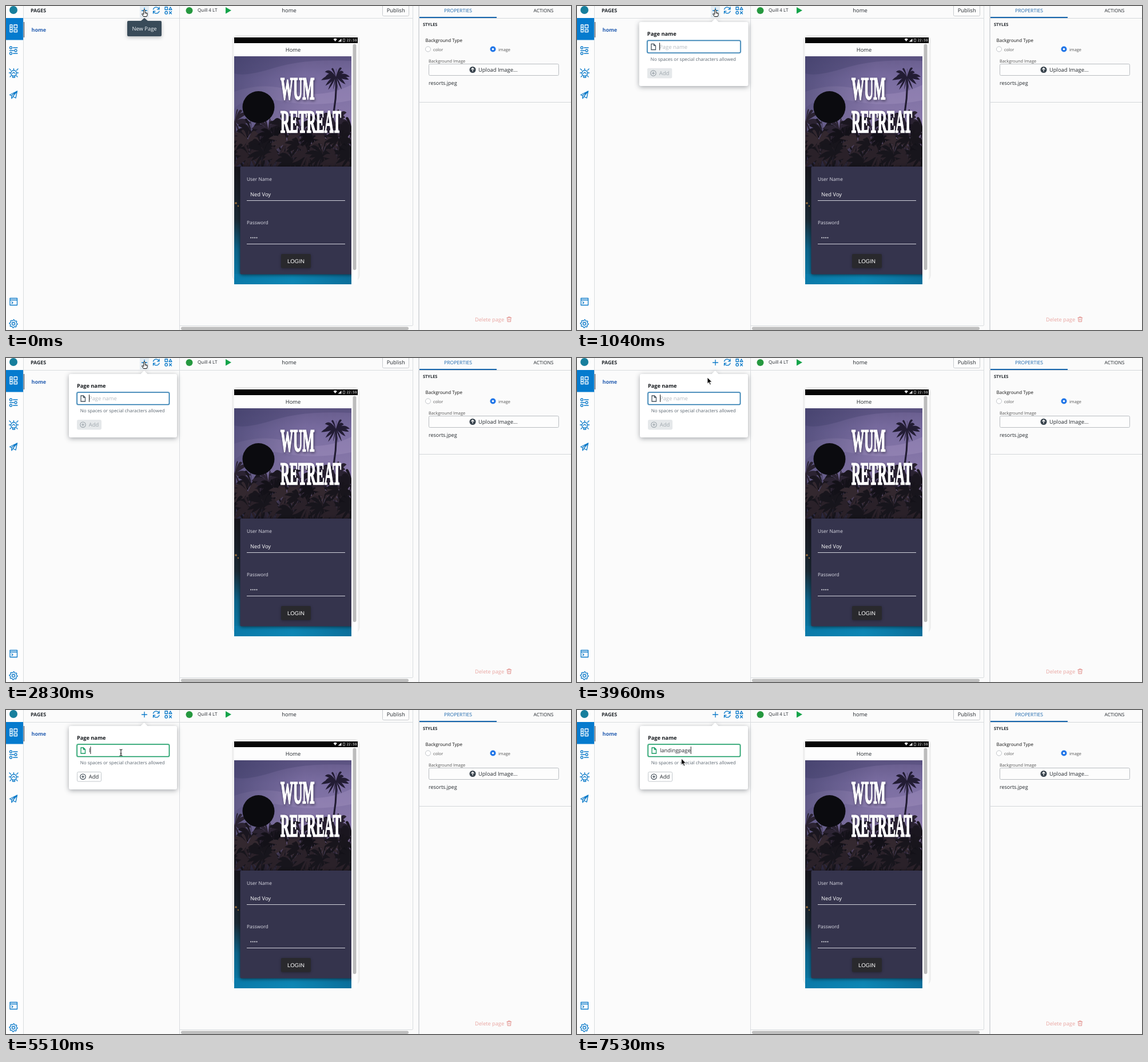
Write an HTML page that moves like this. It is 988 px wide and 567 px high and loops after 8000 ms.

```html
<!DOCTYPE html>
<html lang="en">
<head>
<meta charset="utf-8">
<title>Page builder</title>
<style>
html, body { margin: 0; width: 100%; height: 100%; overflow: hidden; background: #fbfbfb; }
svg { display: block; width: 988px; height: 567px; }
text { font: 9.4px "Open Sans", "Noto Sans", sans-serif; fill: #24292e; text-rendering: geometricPrecision; white-space: pre; }
.bold { font-weight: 700; }
.mid { text-anchor: middle; }
.s73 { font-size: 7.35px; fill: #555; }
.s8 { font-size: 8px; }
.s86 { font-size: 8.6px; }
.field { font-size: 8.4px; fill: #dcdce6; }
.light { fill: #fff; }
.wordmark { font: 700 22.3px "Liberation Serif", serif; fill: #fff; stroke: #fff; stroke-width: .9; }
.rule { stroke: #d9dcdf; fill: none; }
.icon { fill: none; stroke: #0b7ac9; stroke-width: 1.3; stroke-linecap: round; stroke-linejoin: round; }
.card { filter: drop-shadow(0 2px 4px rgba(20, 30, 40, .38)); }
</style>
</head>
<body>
<svg viewBox="0 0 988 567">
  <defs>
    <linearGradient id="sky" x2="0" y2="1">
      <stop offset="0" stop-color="#675c8c"/>
      <stop offset=".1" stop-color="#7a6da1"/>
      <stop offset=".28" stop-color="#8a7aab"/>
      <stop offset=".37" stop-color="#66577b"/>
      <stop offset=".44" stop-color="#2b2430"/>
      <stop offset=".6" stop-color="#17151c"/>
    </linearGradient>
    <linearGradient id="shade">
      <stop offset="0" stop-color="#34365f" stop-opacity=".5"/>
      <stop offset=".6" stop-color="#34365f" stop-opacity="0"/>
    </linearGradient>
    <linearGradient id="shore" x2="0" y2="1">
      <stop offset="0" stop-color="#17151c"/>
      <stop offset=".45" stop-color="#1b2a35"/>
      <stop offset=".7" stop-color="#0c6389"/>
      <stop offset="1" stop-color="#0a7dab"/>
    </linearGradient>
    <linearGradient id="pool">
      <stop offset="0" stop-color="#0a7aa9"/>
      <stop offset=".5" stop-color="#0d86b4"/>
      <stop offset="1" stop-color="#0b6f9b"/>
    </linearGradient>
    <clipPath id="photoClip"><rect x="399" y="88" width="205" height="399"/></clipPath>
  </defs>

  <rect width="988" height="567" fill="#fbfbfb"/>

  <!-- sidebar -->
  <rect width="30" height="567" fill="#fdfdfd"/>
  <path class="rule" d="M30.5 0V567M30 21.5H303"/>
  <circle cx="13" cy="7" r="7" fill="#177f9d"/>
  <rect y="21" width="30" height="38.500" fill="#057bce"/>
  <rect x="31" y="28" width="1" height="27" fill="#2d3440"/>
  <g class="icon">
    <path stroke="#fff" d="M7 33h4v12.500h-4zM14 33h5.500v5.500h-5.500zM14 41.500h5.500v4h-5.500zM7 37h4M7 41h4"/>
    <path d="M12.500 73h7.500M6.500 78h7M12.500 83h7.500"/>
    <circle cx="8.500" cy="73" r="2"/><circle cx="17" cy="78" r="2"/><circle cx="8.500" cy="83" r="2"/>
    <circle cx="13.500" cy="117.500" r="5"/>
    <path d="M11.500 122.500v2.500h4v-2.500M6 110l2.500 2.500M21 110l-2.500 2.500M13.500 109.500v2.500M5.500 117h2M19.500 117h2M7 124l2-2M20 124l-2-2M11 118l2.500-2 2.500 2"/>
    <path d="M6.500 155.500 19.500 149 17 161 12 158.500 10 162 9.500 157ZM9.500 157 19.500 149 12 158.500"/>
    <path d="M7 511.500h12.500v12h-12.500zM7 514.500h12.500M10 517.500l2 1.700-2 1.700"/>
    <circle cx="13" cy="556" r="2.500"/>
    <path id="gear"/>
  </g>

  <!-- page list -->
  <text class="bold" x="43" y="11" style="font-size:8.8px">PAGES</text>
  <text class="bold" x="44.500" y="45" style="font-size:9px;fill:#2860b2">home</text>
  <rect id="hover" x="234" width="16" height="20" fill="#e3ecf3"/>
  <g class="icon">
    <path d="M237.500 8h9M242 3.500v9"/>
    <path d="M257.500 6a5.300 5.300 0 0 1 10-.500M268 2v3.800h-3.600M268 9a5.300 5.300 0 0 1-10 .500M257.500 13V9.200h3.600"/>
    <path d="M278 2h4.500v4.500h-4.500zM287.500 2l2.500 4.500h-5zM285.500 9.800l4 4M289.500 9.800l-4 4"/>
    <circle cx="280.200" cy="11.800" r="2.300"/>
  </g>

  <!-- canvas -->
  <path class="rule" d="M303.500 0V567M304 21.500H711.500M711.500 0V559M304 559.500H711"/>
  <circle cx="320.500" cy="8" r="6" fill="#25983f"/>
  <text class="s8" x="335" y="10">Quill 4 LT</text>
  <path d="M384 2 394 7.800 384 13.500Z" fill="#14a44a"/>
  <text class="mid" x="495" y="11">home</text>
  <rect x="658.500" y="-5.500" width="46" height="23" rx="2" fill="#fdfdfd" stroke="#c8cbce"/>
  <text class="mid" x="681.700" y="11">Publish</text>
  <rect x="306" y="561.500" width="398" height="5.500" rx="2.700" fill="#bfbfbf"/>

  <!-- phone -->
  <rect x="395.500" y="51" width="223" height="430" rx="9" fill="#eaeaea"/>
  <rect x="397" y="53" width="220" height="426" rx="6" fill="#f3f3f3"/>
  <rect x="399" y="65" width="216" height="422" fill="#fdfdfd"/>
  <rect x="399" y="55" width="216" height="10" fill="#060606"/>
  <g fill="#eee">
    <path d="M572.500 58q3.200-2.500 6.400 0L575.700 62ZM580.500 62.500h6v-5.500z"/>
    <path d="M589.500 57.500h3v5h-3z" fill="none" stroke="#bbb" stroke-width=".8"/>
  </g>
  <text class="light" x="595.500" y="62" style="font:6px 'DejaVu Sans Mono',monospace">22:59</text>
  <text class="mid" x="502" y="80">Home</text>
  <g clip-path="url(#photoClip)">
    <rect x="399" y="88" width="205" height="399" fill="url(#sky)"/>
    <path d="M399 88H604V96Q520 92 470 108T399 118Z" fill="#4a4470" opacity=".4"/>
    <path d="M399 150Q450 132 500 148T604 138V165Q540 178 480 166T399 180Z" fill="#a595c2" opacity=".35"/>
    <rect x="399" y="88" width="205" height="200" fill="url(#shade)"/>
    <g id="palms"></g>
    <rect x="399" y="281" width="205" height="206" fill="url(#shore)"/>
    <g fill="#c48a43" opacity=".75"><circle cx="402" cy="345" r="1.800"/><circle cx="406" cy="350" r="1.200"/></g>
    <rect x="399" y="469" width="205" height="18" fill="url(#pool)"/>
    <circle cx="441.500" cy="177" r="28" fill="#0b0b0f"/>
    <g style="filter:drop-shadow(1px 2px 2px rgba(20,15,40,.6))">
      <g transform="translate(480 163) scale(1 2.500)"><text class="wordmark">WUM</text></g>
      <g transform="translate(480 221) scale(1 2.500)"><text class="wordmark">RETREAT</text></g>
    </g>
    <rect x="409.500" y="281" width="200" height="188.500" rx="2" fill="#35344d" style="filter:drop-shadow(0 1px 3px rgba(0,0,0,.6))"/>
    <text class="field" x="421" y="305.500">User Name</text>
    <text class="light" x="427" y="333">Ned Voy</text>
    <text class="field" x="421" y="382">Password</text>
    <path d="M428.300 405.500h11" stroke="#f2f2f6" stroke-width="2" stroke-linecap="round" stroke-dasharray="0 3.400"/>
    <path d="M421 340.500H593M421 416.500H593" stroke="#d2d2db"/>
    <rect x="481" y="434" width="52" height="24.500" rx="2" fill="#29292d" style="filter:drop-shadow(0 1px 2px rgba(0,0,0,.3))"/>
    <text class="mid" x="507" y="449.500" style="font:9.700px 'Liberation Sans',sans-serif;fill:#fff">LOGIN</text>
  </g>
  <rect x="606.500" y="66.500" width="6" height="395.500" rx="3" fill="#bcbcbc"/>

  <!-- properties -->
  <path class="rule" d="M722 0V567" style="stroke:#d8dbde;stroke-width:2"/>
  <path class="rule" d="M723 21.500H988M723 168.500H988" style="stroke:#d3d6d9"/>
  <rect x="723" y="19" width="135" height="2" fill="#1766ad"/>
  <text class="mid s86" x="790.500" y="10.500" style="fill:#1c67ad">PROPERTIES</text>
  <text class="mid" x="940" y="10.500" style="font-size:8.400px">ACTIONS</text>
  <text class="bold" x="729" y="35" style="font-size:7.400px">STYLES</text>
  <text class="s8" x="733.500" y="63" style="fill:#111">Background Type</text>
  <circle cx="738" cy="75.500" r="4.500" fill="#fff" stroke="#b3b7bb" stroke-width=".8"/>
  <text class="s73" x="747" y="78.500">color</text>
  <circle cx="851.500" cy="75.500" r="5" fill="#2377e8"/><circle cx="851.500" cy="75.500" r="1.800" fill="#fff"/>
  <text class="s73" x="861" y="78.500">image</text>
  <text class="s73" x="739" y="99">Background Image</text>
  <rect x="739.500" y="101.500" width="227" height="20" rx="2" fill="#fdfdfd" stroke="#b9bdc1"/>
  <circle cx="816" cy="111.500" r="5.500" fill="#37424c"/>
  <path d="M816 114.500v-5.500M813.500 111l2.500-2.500 2.500 2.500" fill="none" stroke="#fff" stroke-width="1.300"/>
  <text x="826" y="115">Upload Image...</text>
  <text x="739" y="138" style="font-size:9px">resorts.jpeg</text>
  <text x="820" y="552" style="font-size:9.200px;fill:#e9a5a0">Delete page</text>
  <path d="M875.500 545.500h8.500M878 545.500v-1.500h3.500v1.500M876.500 546l.600 6.500h5.300l.600-6.500M878.700 547.500v3M880.800 547.500v3" fill="none" stroke="#e08b86" stroke-width=".9"/>

  <!-- page name popover -->
  <g id="popover">
    <g class="card"><path d="M113 28H235.500L241.500 22 247.500 28H296a3 3 0 0 1 3 3V136a3 3 0 0 1-3 3H113a3 3 0 0 1-3-3V31a3 3 0 0 1 3-3Z" fill="#fff"/></g>
    <text class="bold" x="124" y="52" style="font-size:9.200px;fill:#15191d">Page name</text>
    <g id="frame">
      <rect x="123.500" y="59.500" width="162.500" height="22.500" rx="3" fill="none" stroke-width="2" stroke-opacity=".35"/>
      <rect x="124.300" y="60.300" width="161" height="21" rx="2" fill="#fff" stroke-width="1.300"/>
    </g>
    <path id="file" d="M131 66h4.500l3 3v7h-7.500zM135.500 66v3h3" fill="none" stroke-width="1.300"/>
    <text id="value" x="145" y="74.300"></text>
    <rect id="caret" y="64" width="1" height="13" fill="#222"/>
    <text class="s8" x="129.700" y="95" style="fill:#5b6670">No spaces or special characters allowed</text>
    <g id="add">
      <rect x="124.500" y="108.500" width="42" height="16.500" rx="2"/>
      <g fill="none" stroke-width="1.100"><circle cx="134.500" cy="116.700" r="4.700"/><path d="M132 116.700h5M134.500 114.200v5"/></g>
      <text x="144.800" y="120.200">Add</text>
    </g>
  </g>

  <g id="tooltip">
    <path d="M214 26H236L242 21 248 26H270a2 2 0 0 1 2 2V51a2 2 0 0 1-2 2H214a2 2 0 0 1-2-2V28a2 2 0 0 1 2-2Z" fill="#394b59" style="filter:drop-shadow(0 2px 3px rgba(20,30,40,.3))"/>
    <text class="mid" x="242" y="43" style="fill:#f5f8fa">New Page</text>
  </g>

  <g id="hand"><path d="M-1.300-4.500q1.300-1.500 2.400 0V0l4 1v3.500L4 7H-1.500L-4.500 2.500q.500-1.500 2 0l1.200 1Z" fill="#fff" stroke="#111" stroke-width="1"/><path d="M1.200 0v2M3.200.500v2" stroke="#111" stroke-width=".7"/></g>
  <g id="arrow"><path d="M0 0V11L2.600 8.700 4.500 13 6.300 12.200 4.400 8H8Z" fill="#0b0b0b" stroke="#fff" stroke-width=".8"/></g>
  <g id="beam"><path d="M-2.500-5.500Q0-5.500 0-4Q0-5.500 2.500-5.500M0-4V4M-2.500 5.500Q0 5.500 0 4Q0 5.500 2.500 5.500M-1.300 1.500h2.600" fill="none" stroke="#161616" stroke-width="1.100"/></g>
</svg>
<script>
const $ = id => document.getElementById(id);
const LOOP = 8000;

// Each table holds [start ms, ...state]; the last started row applies.
const popSteps = [[0, 0, 0], [860, .55, .5], [1040, 1.01, 1], [1160, 1, 1]]; // scale, focus glow
const tipSteps = [[0, 1, 1], [860, .1, .87], [1040, 0, .8]]; // opacity, scale
const caretSteps = [[0, 1], [1400, 0], [1880, 1], [2350, 0], [2830, 1], [3360, 0], [3840, 1],
  [4310, 0], [4790, 1], [5270, 0], [5510, 1], [7050, 0], [7530, 1]];
const typeSteps = [[0, 0], [5510, 1], [5630, 2], [5750, 4], [5870, 5], [5980, 7],
  [6220, 8], [6340, 9], [6460, 10], [6570, 11]];
const cursorSteps = [[0, 'hand', 242, 11.5], [3840, 'arrow', 238, 15], [3960, 'arrow', 228, 34],
  [4080, 'arrow', 214, 54], [4190, 'beam', 204, 71], [4310, 'beam', 201, 74.5],
  [7170, 'beam', 199, 75.5], [7290, 'beam', 194, 78], [7410, 'arrow', 186, 83], [7530, 'arrow', 182.5, 85]];

const at = (steps, t) => steps.findLast(s => s[0] <= t).slice(1);
const set = (el, attrs) => { for (const k in attrs) el.setAttribute(k, attrs[k]); };
const scaled = (s, x, y) => `translate(${x} ${y}) scale(${s}) translate(${-x} ${-y})`;

function gearPath(cx, cy) {
  let d = '';
  for (let i = 0; i < 32; i++) {
    const r = i % 4 < 2 ? 7 : 5.4, a = i * Math.PI / 16;
    d += `${i ? 'L' : 'M'}${cx + r * Math.cos(a)} ${cy + r * Math.sin(a)}`;
  }
  return d + 'Z';
}

let seed = 11;
const rand = () => (seed = seed * 16807 % 2147483647) / 2147483647;

// A crown of arched fronds, each with a thick hanging underside.
function palm(x, y, size, color, base) {
  let d = '';
  for (let i = 0; i < 15; i++) {
    const a = i * Math.PI * 2 / 15 + rand() * .3, r = size * (.75 + rand() * .35);
    const ex = x + r * Math.cos(a), ey = y + r * Math.sin(a) * .85 + size * .2;
    const mx = x + r * .55 * Math.cos(a), my = y + r * .6 * Math.sin(a) - size * .2;
    d += `M${x} ${y}Q${mx} ${my - size * .1} ${ex} ${ey}Q${mx} ${my + size * .4} ${x} ${y}`;
  }
  return `<path d="M${x} ${y}Q${x + 2} ${(y + base) / 2} ${x - 7} ${base}" fill="none" stroke="${color}" stroke-width="${size / 8}"/>
    <path d="${d}" fill="${color}"/>`;
}

function forest(y, count, colors) {
  let trees = '';
  for (let i = 0; i < count; i++)
    trees += palm(400 + i * 205 / (count - 1), y + rand() * 26, 26 + rand() * 12, colors[i % colors.length], 290);
  return trees;
}

$('gear').setAttribute('d', gearPath(13, 556));
$('palms').innerHTML = palm(577, 124, 25, '#221c33', 200)
  + forest(202, 8, ['#2b2332', '#1a161f'])
  + forest(226, 10, ['#131118', '#33282f', '#18151c'])
  + forest(252, 9, ['#17151c', '#2a2129']);

function draw(t) {
  const [pop, glow] = at(popSteps, t);
  set($('popover'), { visibility: pop ? 'visible' : 'hidden', transform: scaled(pop || 1, 241.5, 28) });

  const [opacity, tipScale] = at(tipSteps, t);
  set($('tooltip'), { opacity, transform: scaled(tipScale, 242, 24) });

  const [count] = at(typeSteps, t);
  const value = $('value'), valid = count > 0;
  value.textContent = valid ? 'landingpage'.slice(0, count) : 'Page name';
  value.style.fill = valid ? '#24292e' : '#b5bbc1';
  const accent = valid ? '#159a62' : '#2476ad';
  set($('frame'), { stroke: accent, opacity: glow });
  set($('file'), { stroke: valid ? accent : '#4a5660' });
  set($('caret'), {
    x: 145 + (valid ? value.getComputedTextLength() : 0),
    opacity: at(caretSteps, t)[0]
  });

  const [box, icon, label] = $('add').children;
  set(box, { fill: valid ? '#fff' : '#e5e8ea', stroke: valid ? '#c3c8cc' : '#e5e8ea' });
  set(icon, { stroke: valid ? '#34414c' : '#9aa3aa' });
  label.style.fill = valid ? '#24292e' : '#a0a8ae';

  const [kind, x, y] = at(cursorSteps, t);
  for (const id of ['hand', 'arrow', 'beam'])
    set($(id), { visibility: id === kind ? 'visible' : 'hidden', transform: `translate(${x} ${y})` });
  set($('hover'), { opacity: kind === 'hand' ? 1 : 0 });
}

const start = performance.now();
function tick() {
  draw((performance.now() - start) % LOOP);
  requestAnimationFrame(tick);
}
tick();
</script>
</body>
</html>
```
